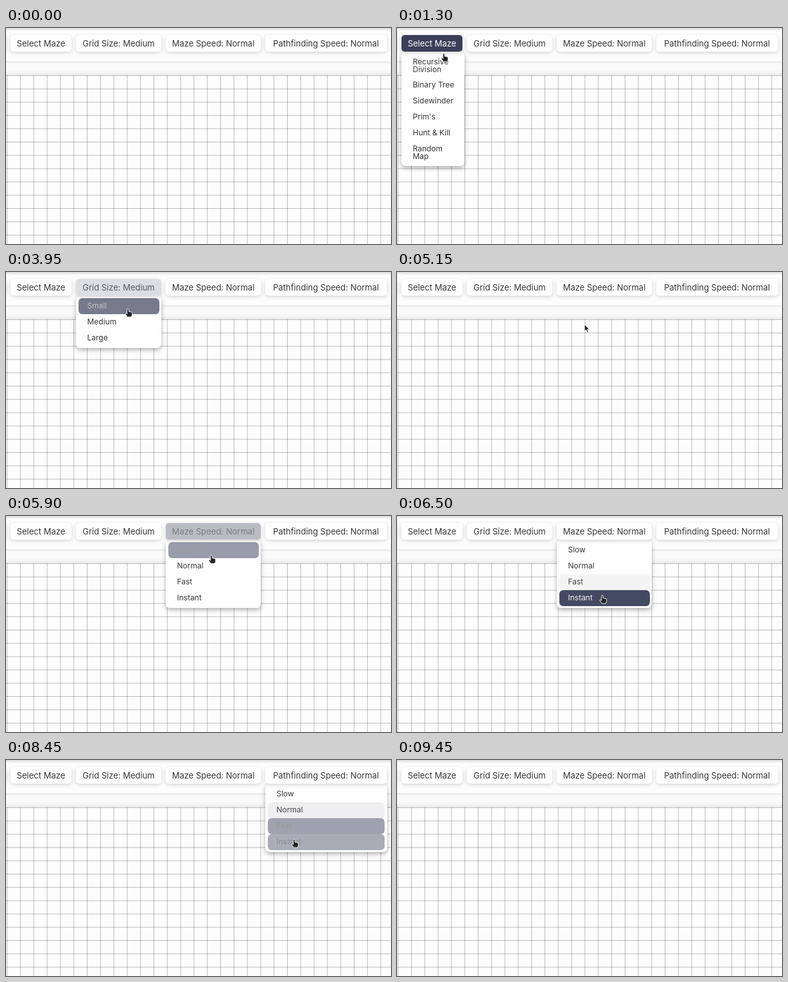
Recreate the animation shown at these times as an HTML page. Size 600x338 px, loop 9.5 s.

```html
<!DOCTYPE html>
<html lang="en">
<head>
<meta charset="utf-8">
<title>Maze menu tour</title>
<style>
  html, body { margin: 0; width: 100%; height: 100%; overflow: hidden; background: #fafafa; }
  #stage { position: relative; width: 600px; height: 338px; overflow: hidden;
    font: 13px Inter, "Open Sans", sans-serif; }
  #stage * { box-sizing: border-box; }
  #stage div, #stage svg { position: absolute; }
  #nav { width: 600px; height: 51.5px; background: linear-gradient(#dddbdc, #fdfdfd 5px);
    box-shadow: 0 1px 3px rgba(0,0,0,.14); }
  #grid { top: 74px; left: -10px; width: 620px; height: 280px; background: #fdfdfd;
    box-shadow: 0 0 8px rgba(0,0,0,.14); }
  #lines { left: 0; top: 0; stroke: rgba(0,0,0,.26); }
  .button { top: 10.5px; height: 26.5px; border-radius: 5px; background: #fff; z-index: 2;
    line-height: 26px; text-align: center; white-space: nowrap;
    box-shadow: 0 2px 6px rgba(0,0,0,.16); }
  .menu { top: 37px; min-width: 97.5px; border-radius: 6px; background: #fdfdfd; transform-origin: top;
    box-shadow: 0 3px 7px rgba(0,0,0,.3); visibility: hidden; font-size: 12px; z-index: 1; }
  .item { left: 3.5px; right: 3.5px; padding-left: 14px; border-radius: 6px;
    display: flex; align-items: center; line-height: 11.5px; white-space: pre; }
  #cursor { left: 0; top: 0; overflow: visible; z-index: 3; fill: #222; stroke: #eee; }
</style>
</head>
<body>
<div id="stage">
  <div id="nav"></div>
  <div id="grid"></div>
  <svg id="lines" width="600" height="338"><path id="columns"/><path id="rows"/></svg>
  <div class="button" style="left:-80px;width:80px"></div>
  <svg id="cursor" width="1" height="1">
    <path id="arrow" d="M0 0V10.8L2.5 8.5 4.3 12.6 6.2 11.8 4.4 7.8H7.8Z"/>
    <path id="hand" d="M-1.3 1.3Q-1.3 0 0 0T1.3 1.3V4.5L5 5.2Q6.6 5.6 6.6 7V9.5L5.6 13H-.6L-3.9 8.6Q-4.3 7-2.8 7.1L-1.3 8.3Z"/>
  </svg>
</div>
<script>
const LOOP = 9500, FADE = 300, GROW = 300, LAG = 50, CELL = 20.8;
const BUTTON_TOP = 10.5, MENU_TOP = 37, PAD = 3.5;
const $ = id => document.getElementById(id);
const clamp = v => Math.min(1, Math.max(0, v));
const mix = (a, b, k) => a + (b - a) * k;
const easeOut = p => 1 - (1 - clamp(p)) ** 2.3;
const easeInOut = p => p * p * (3 - 2 * p);

function box(parent, cls, text, style) {
  const el = document.createElement('div');
  el.className = cls;
  el.textContent = text;
  for (const k in style) el.style[k] = style[k] + 'px';
  parent.append(el);
  return el;
}

const makePart = (el, top, bottom) => ({ el, top, bottom, visits: [] });

// visit: time at the button, start of the drop, arrival at the last item, time of leaving
function makeMenu({ label, names, left, width, x, visit }) {
  const button = makePart(box($('stage'), 'button', label, { left, width }), BUTTON_TOP, MENU_TOP);
  const el = box($('stage'), 'menu', '', { left, width });
  let y = PAD;
  const items = names.map(name => {
    const height = name.includes('\n') ? 36 : 25;
    const item = makePart(box(el, 'item', name, { top: y, height }), MENU_TOP + y, MENU_TOP + y + height);
    y += height;
    return item;
  });
  el.style.height = y + PAD + 'px';
  const menu = makePart(el, BUTTON_TOP, MENU_TOP + y + PAD);
  return Object.assign(menu, { left, right: left + el.offsetWidth, x, visit, button, items });
}

const speeds = ['Slow', 'Normal', 'Fast', 'Instant'];
const menus = [
  { label: 'Select Maze', left: 7, width: 95, x: 73, visit: [620, 1150, 2050, 2550],
    names: ['Recursive\nDivision', 'Binary Tree', 'Sidewinder', "Prim's", 'Hunt & Kill', 'Random\nMap'] },
  { label: 'Grid Size: Medium', left: 109, width: 133, x: 190, visit: [3250, 3500, 4510, 4700],
    names: ['Small', 'Medium', 'Large'] },
  { label: 'Maze Speed: Normal', left: 249, width: 148, x: 320, visit: [5343, 5580, 6380, 6600],
    names: speeds },
  { label: 'Pathfinding Speed: Normal', left: 404, width: 189.5, x: 449, visit: [7250, 7820, 8445, 8950],
    names: speeds }
].map(makeMenu);

// Each stop: arrival, departure, place
const stops = [
  { arrive: 0, depart: 250, x: 92, y: -20 },
  ...menus.flatMap(({ x, bottom, visit: [arrive, drop, land, leave] }) => [
    { arrive, depart: drop, x, y: 27 },
    { arrive: land, depart: leave, x, y: bottom - 20 }
  ]),
  { arrive: 9450, depart: LOOP, x: 640, y: 110 }
];

// Going to the next menu, the cursor moves sideways first and then swings up
function cursorAt(t) {
  const i = stops.findLastIndex(s => s.arrive <= t);
  const from = stops[i], to = stops[i + 1] ?? from;
  const k = easeInOut(clamp((t - from.depart) / (to.arrive - from.depart)));
  return [mix(from.x, to.x, k), mix(from.y, to.y, to.y < from.y ? k ** 6 : k)];
}

// Walk the path once to note when each part is entered and left
function track(part, inside, t) {
  if (inside && !part.inside) part.visits.push({ on: t + LAG, off: Infinity });
  if (!inside && part.inside) part.visits.at(-1).off = t + LAG;
  part.inside = inside;
}
for (let t = 0; t < LOOP; t += 5) {
  const [x, y] = cursorAt(t);
  for (const m of menus) {
    const within = p => x >= m.left && x <= m.right && y >= p.top && y < p.bottom;
    track(m, within(m.inside ? m : m.button), t);
    track(m.button, within(m.button), t);
    for (const item of m.items) track(item, m.inside && within(item), t);
  }
}

function paint({ el, visits }, t) {
  const k = visits.reduce((sum, v) => sum + easeOut((t - v.on) / FADE) - easeOut((t - v.off) / FADE), 0);
  const ink = mix(54, 255, k);
  el.style.background = `rgb(${[58, 64, 90].map(c => mix(254, c, k))})`;
  el.style.color = `rgb(${ink},${ink},${ink})`;
}

// Menus grow past their full height, then settle
const growth = p => p < .8 ? 1.1 * easeInOut(clamp(p / .8)) : mix(1.1, 1, easeInOut(clamp(p * 5 - 4)));

function draw(t) {
  let pointing = false;
  for (const m of menus) {
    const visit = m.visits.find(v => t >= v.on && t < v.off);
    if (visit) {
      pointing = true;
      m.el.style.transform = `scaleY(${growth((t - visit.on) / GROW)})`;
    }
    m.el.style.visibility = visit ? 'visible' : 'hidden';
    [m.button, ...m.items].forEach(part => paint(part, t));
  }
  $('cursor').style.transform = `translate(${cursorAt(t).map(v => v + 'px')})`;
  $('arrow').style.display = pointing ? 'none' : '';
  $('hand').style.display = pointing ? '' : 'none';
}

const repeat = (count, make) => Array.from({ length: count }, (_, i) => make(i * CELL)).join('');
$('columns').setAttribute('d', repeat(29, x => `M${x + 1.7} 74V338`));
$('rows').setAttribute('d', repeat(13, y => `M0 ${y + 74.5}H600`));

const start = performance.now();
(function frame() {
  draw((performance.now() - start) % LOOP);
  requestAnimationFrame(frame);
})();
</script>
</body>
</html>
```
